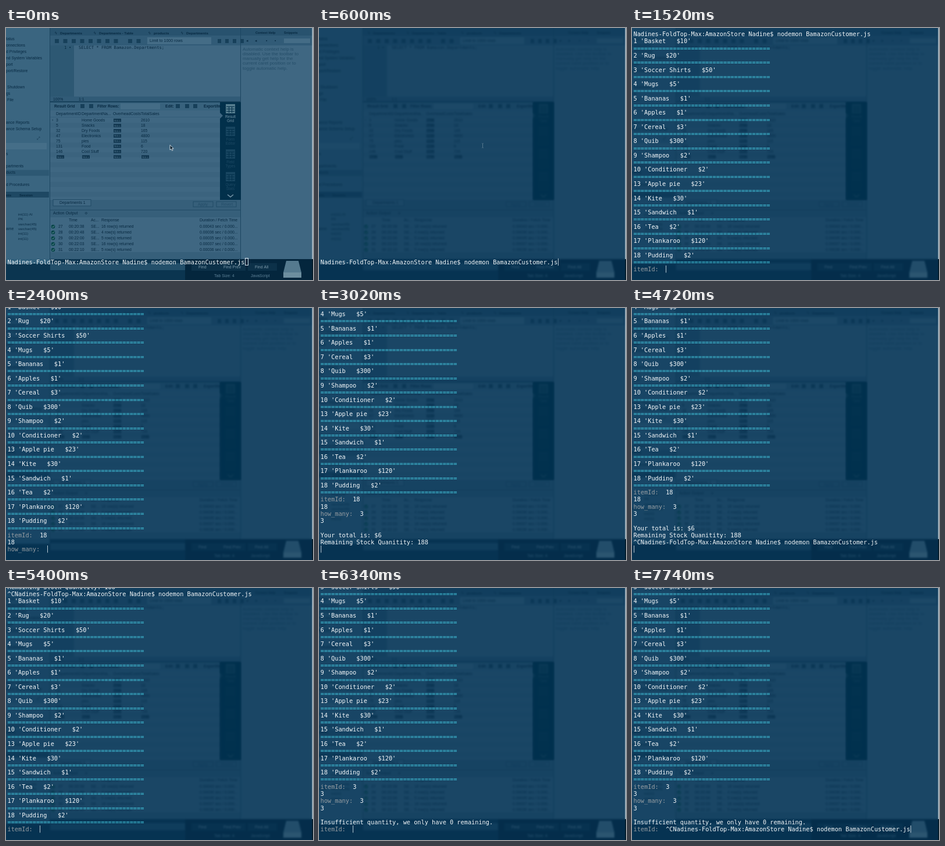
An HTML page with a canvas for the animation above (7760 ms loop, 528x434 px).

```html
<!DOCTYPE html>
<html lang="en">
<head>
<meta charset="utf-8">
<title>Store terminal</title>
<style>
html, body { margin: 0; width: 100%; height: 100%; overflow: hidden; background: #1a4766; }
canvas { display: block; width: 528px; height: 434px; }
</style>
</head>
<body>
<canvas id="stage" width="528" height="434"></canvas>
<script>
const W = 528, H = 434, LOOP = 7760;
const MONO = '"DejaVu Sans Mono", monospace';
const SANS = '"Liberation Sans", Arial, sans-serif';
const INK = '#082a42', PANE = '#3f6782', BAR = '#315b77', LINE = '#1c4661', DARK = '#02304b';
const ctx = document.getElementById('stage').getContext('2d');

// ---- desktop seen through the terminal ----
function layer(paint) {
  const canvas = document.createElement('canvas');
  canvas.width = W;
  canvas.height = H;
  paint(canvas.getContext('2d'));
  return canvas;
}

function paintDesktop(c) {
  const box = (x, y, w, h, color) => { c.fillStyle = color; c.fillRect(x, y, w, h); };
  const say = (s, x, y, color = INK, size = 6.8, font = SANS) => {
    c.font = size + 'px ' + font;
    c.fillStyle = color;
    c.fillText(s, x, y);
  };
  const bold = (s, x, y, size = 6.6) => say(s, x, y, INK, 'bold ' + size);
  const column = (rows, x, y, step, color, size) =>
    rows.forEach((s, i) => s && say(s, x, y + i * step, color, size));
  c.textBaseline = 'middle';

  box(0, 0, W, 398, PANE);
  box(0, 0, 75, 398, '#3a6580');
  box(75, 0, 329, 30, BAR);
  box(75, 0, 453, 13, '#28526e');
  box(75, 30, 42, 88, '#2d5873');
  box(75, 118, 329, 10, BAR);
  box(75, 126.5, 329, 1.5, '#0f3852');
  box(75, 128, 293, 14, '#38627d');
  for (let y = 163; y < 290; y += 17) box(76, y, 292, 8.5, '#3b637e');
  box(75, 296, 329, 30, '#365f7a');
  box(75, 386, 329, 12, '#365f7a');
  box(75, 0, 1, 398, LINE);
  box(403, 0, 1, 398, LINE);
  box(404, 13, 124, 17, BAR);

  // left navigator
  column(['tatus', 'onnections', 'd Privileges', 'nd System Variables', 'port', 'port/Restore'], 0, 19, 11);
  column(['Shutdown', '', 'File'], 2, 102, 11);
  say('gs', 0, 113);
  column(['ance Reports', 'ance Schema Setup'], 0, 163, 11);
  say('⤢', 53, 190);
  box(0, 198, 70, 11, '#456e88');
  box(0, 244.5, 74, 10, '#2d5873');
  column(['s', '', 'partments', 'ducts', '', 'd Procedures'], 0, 217, 10.6);
  box(0, 282, 74, 10, '#1e4863');
  bold('nts', 0, 288, 6);
  bold('Session', 23, 288, 6);
  column(['int(11) AI', 'PK', 'varchar(45)', 'varchar(45)', 'int(11)', 'int(11)'], 21, 321, 8.4, INK, 6.2);
  say('ame', 0, 346);

  // editor
  ['Departments', 'Departments - Table', 'products', 'Departments'].forEach((s, i) => {
    const x = [93, 160, 254, 310][i];
    say('ϟ', x - 9, 9);
    bold(s, x, 9, 6.2);
  });
  for (let i = 0; i < 10; i++) box(84 + i * 14.5 + (i > 7 ? 10 : 0), 19, 7, 7, '#17405a');
  box(243, 16, 110, 12, '#446c86');
  say('Limit to 1000 rows', 247, 22, INK, 7);
  for (let i = 0; i < 4; i++) box(364 + i * 13, 19, 6, 7, '#17405a');
  say('1', 100, 34, INK, 7, MONO);
  say('•', 108, 34, INK, 7, MONO);
  say('SELECT * FROM Bamazon.Departments;', 125, 34, INK, 7.2, MONO);
  say('100%', 81, 123);
  say('1:1', 125, 123);

  // result grid
  bold('Result Grid', 83, 135);
  for (const x of [128, 143, 292, 308, 322]) box(x, 131, 7, 7, '#17405a');
  bold('Filter Rows:', 157, 135);
  box(197, 130, 68, 10, '#446c86');
  bold('Edit:', 274, 135);
  bold('Export/Im', 340, 135);
  ['DepartmentID', 'DepartmentNa...', 'OverheadCosts', 'TotalSales'].forEach((s, i) =>
    say(s, [86, 130, 184, 232][i], 148, INK, 6.9));
  box(76, 153, 292, 0.6, '#2e5873');
  const step = 8.95;
  column(['3', '5', '32', '47', '75', '131', '146'], 86, 159, step);
  column(['Home Goods', 'Snacks', 'Dry Foods', 'Electronics', 'pies', 'Food', 'Cool Stuff'], 130, 159, step);
  column(['2610', '18', '165', '4800', '115', '6', '720'], 232, 159, step);
  say('›', 79, 159);
  const nullTag = (x, y) => { box(x, y - 2.8, 13, 5.6, '#0f344d'); say('NULL', x + 1, y + 0.4, '#547a92', 4.4); };
  for (let i = 0; i < 7; i++) nullTag(185, 159 + i * step);
  [87, 131, 185, 233].forEach(x => nullTag(x, 222));

  // dark view picker
  box(368, 128, 36, 168, DARK);
  c.fillStyle = PANE;
  c.beginPath(); c.moveTo(368, 146); c.lineTo(373, 151); c.lineTo(368, 156); c.fill();
  c.textAlign = 'center';
  [['Result', 'Grid'], ['Form', 'Editor'], ['Field', 'Types'], ['Query', 'Stats']].forEach((pair, i) => {
    const y = 139 + i * 39, color = i ? '#1d4964' : '#7595a8';
    box(378, y - 8, 16, 16, i ? '#174560' : '#537b8d');
    for (let j = -4; j < 8; j += 4) box(379, y + j, 14, 1, DARK);
    box(383, y - 4, 1, 11, DARK);
    box(388, y - 4, 1, 11, DARK);
    pair.forEach((s, j) => say(s, 386, y + 14 + j * 7, color, 6.3));
  });
  c.textAlign = 'left';
  c.strokeStyle = '#7898aa';
  c.lineWidth = 1.5;
  c.beginPath(); c.moveTo(381, 287); c.lineTo(386, 291); c.lineTo(391, 287); c.stroke();

  // output
  box(81, 296, 65, 11, PANE);
  c.strokeStyle = LINE;
  c.lineWidth = 0.8;
  c.strokeRect(81, 295.5, 65, 11);
  say('Departments 1', 92, 301.5);
  for (const [s, x] of [['Apply', 322], ['Revert', 362]]) {
    c.strokeRect(x, 299, 34, 9);
    say(s, x + 8, 304, '#244d68');
  }
  box(75, 313, 329, 0.8, LINE);
  say('Action Output', 81, 319.5, INK, 7);
  say('≎', 135, 319.5);
  ['Time', 'Ac...', 'Response', 'Duration / Fetch Time'].forEach((s, i) => say(s, [108, 146, 164, 333][i], 331));
  ['20:38', '20:48', '22:00', '22:03', '22:10'].forEach((s, i) => {
    const y = 342 + i * 10;
    c.fillStyle = '#064548';
    c.beginPath(); c.arc(81, y, 3.3, 0, 7); c.fill();
    c.strokeStyle = '#7fa0ac';
    c.beginPath(); c.moveTo(79.3, y); c.lineTo(80.7, y + 1.5); c.lineTo(83, y - 1.5); c.stroke();
    say('' + (27 + i), 90, y);
    say('00:' + s, 108, y);
    say('SE...', 146, y);
    say([16, 4, 5, 16, 5][i] + ' row(s) returned', 164, y);
    say('0.000' + [43, 36, 35, 37, 36][i] + ' sec / 0.000...', 333, y);
  });

  // right help pane
  bold('Context Help', 429, 8, 5.6);
  bold('Snippets', 478, 8, 5.6);
  for (const x of [413, 428, 447, 462]) say(x < 440 ? '◂' : '▪', x, 22);
  box(478, 18, 45, 8, '#446c86');
  column(['Automatic context help is', 'disabled. Use the toolbar to', 'manually get help for the',
    'current caret position or to', 'toggle automatic help.'], 407, 37, 8.1, '#244d68', 7.9);

  // strip below
  box(0, 398, W, 36, '#0b3550');
  box(308, 398, W - 308, 36, '#04263d');
  box(0, 398, 75, 8, '#31607c');
  box(76, 405, 232, 12, '#234f6a');
  for (const [s, x] of [['Find', 331], ['Find Prev', 374], ['Find All', 428]]) {
    box(x - 12, 405, 50, 13, '#0c3149');
    say(s, x, 412, '#7d9aab', 7);
  }
  say('Tab Size: 4', 358, 427, '#5f8298', 7);
  say('JavaScript', 421, 427, '#5f8298', 7);
  c.fillStyle = '#557a8f';
  c.beginPath(); c.moveTo(482, 401); c.lineTo(503, 401); c.lineTo(508, 421); c.lineTo(477, 421); c.fill();
  box(477, 421, 31, 9, '#6d8e9f');
}

const sharp = layer(paintDesktop);
const soft = layer(c => {
  c.drawImage(sharp, 0, 0);
  c.filter = 'blur(1.5px)';
  c.drawImage(sharp, 0, 0);
  c.filter = 'none';
  c.fillStyle = 'rgba(4,51,85,.62)';
  c.fillRect(0, 0, W, H);
  c.filter = 'blur(1px)';
  c.fillStyle = 'rgba(0,49,78,.7)';
  c.fillRect(368, 128, 36, 168);
});

// ---- terminal session ----
const PROMPT = 'Nadines-FoldTop-Max:AmazonStore Nadine$ ';
const COMMAND = 'nodemon BamazonCustomer.js';
const RULE = '='.repeat(38) + '\n';
const GOODS = [
  [1, 'Basket', 10], [2, 'Rug', 20], [3, 'Soccer Shirts', 50], [4, 'Mugs', 5], [5, 'Bananas', 1],
  [6, 'Apples', 1], [7, 'Cereal', 3], [8, 'Quib', 300], [9, 'Shampoo', 2], [10, 'Conditioner', 2],
  [13, 'Apple pie', 23], [14, 'Kite', 30], [15, 'Sandwich', 1], [16, 'Tea', 2],
  [17, 'Plankaroo', 120], [18, 'Pudding', 2]
];
const LIST = GOODS.map(([id, name, cost]) => `${id} '${name}   $${cost}'\n${RULE}`).join('') + 'itemId:  ';

// Time in ms, text added to the log
const SESSION = [
  [0, PROMPT + COMMAND], [880, '\n'], [1420, LIST],
  [1860, '1'], [1980, '8'], [2160, '\n18\nhow_many:  '],
  [2720, '3'], [2980, '\n3\n\nYour total is: $6\nRemaining Stock Quanitity: 188\n'],
  [4060, '^C' + PROMPT], [4340, COMMAND], [4620, '\n'], [5160, LIST],
  [5580, '3'], [5740, '\n3\nhow_many:  '], [6020, '3'],
  [6200, '\n3\n\nInsufficient quantity, we only have 0 remaining.\nitemId:  '],
  [6980, '^C' + PROMPT], [7300, COMMAND]
];
const FOCUS = 160, ENTER = 880;
const LEFT = 2.5, ROW = 12.28, CHAR = 6.189;

function drawTerminal(t) {
  const lines = SESSION.filter(s => s[0] <= t).map(s => s[1]).join('').split('\n');
  const last = lines.length - 1;
  const bottom = last ? 419.4 : 407.2;
  ctx.font = '10.28px ' + MONO;
  ctx.textBaseline = 'alphabetic';
  lines.forEach((line, i) => {
    const y = bottom - (last - i) * ROW;
    if (y < -4) return;
    const label = (line.match(/^(itemId|how_many):/) || [''])[0];
    ctx.fillStyle = '#969da2';
    ctx.fillText(label, LEFT, y);
    ctx.fillStyle = line[0] === '=' ? '#43c4dc' : '#f4f8fa';
    ctx.fillText(line.slice(label.length), LEFT + label.length * CHAR, y);
  });

  const x = Math.round(LEFT + lines[last].length * CHAR);
  if (t < FOCUS) {
    ctx.strokeStyle = '#d5e0e7';
    ctx.lineWidth = 1;
    ctx.strokeRect(x + .5, 396.5, 5, 12);
  } else {
    ctx.fillStyle = '#b9c9d3';
    ctx.fillRect(x, bottom - 10.4, 1, 12.4);
  }
}

const arrow = new Path2D('M282 201.5v8.5l2-1.8 1.4 3 1.6-.7-1.4-2.9h2.6z');
const beam = new Path2D('M280 198.5q1.5 0 1.5 1.5v5q0 1.5-1.5 1.5M283 198.5q-1.5 0-1.5 1.5v5q0 1.5 1.5 1.5');

function drawPointer(t) {
  if (t >= ENTER) return;
  const away = t < FOCUS;
  ctx.lineWidth = away ? 0.9 : 0.7;
  ctx.strokeStyle = away ? '#dce6ec' : '#5d7d92';
  ctx.fillStyle = '#071c2a';
  if (away) ctx.fill(arrow);
  ctx.stroke(away ? arrow : beam);
}

function draw(t) {
  ctx.drawImage(sharp, 0, 0);
  ctx.globalAlpha = Math.min(1, Math.max(0, (t - FOCUS) / 120));
  ctx.drawImage(soft, 0, 0);
  ctx.globalAlpha = 1;
  ctx.fillStyle = '#b3c1ca';
  ctx.fillRect(526.5, 0, 1.5, 398);
  ctx.fillStyle = '#031723';
  ctx.fillRect(526.5, 398, 1.5, 36);
  drawTerminal(t);
  drawPointer(t);
}

const start = performance.now();
function tick() {
  draw((performance.now() - start) % LOOP);
  requestAnimationFrame(tick);
}
tick();
</script>
</body>
</html>
```
